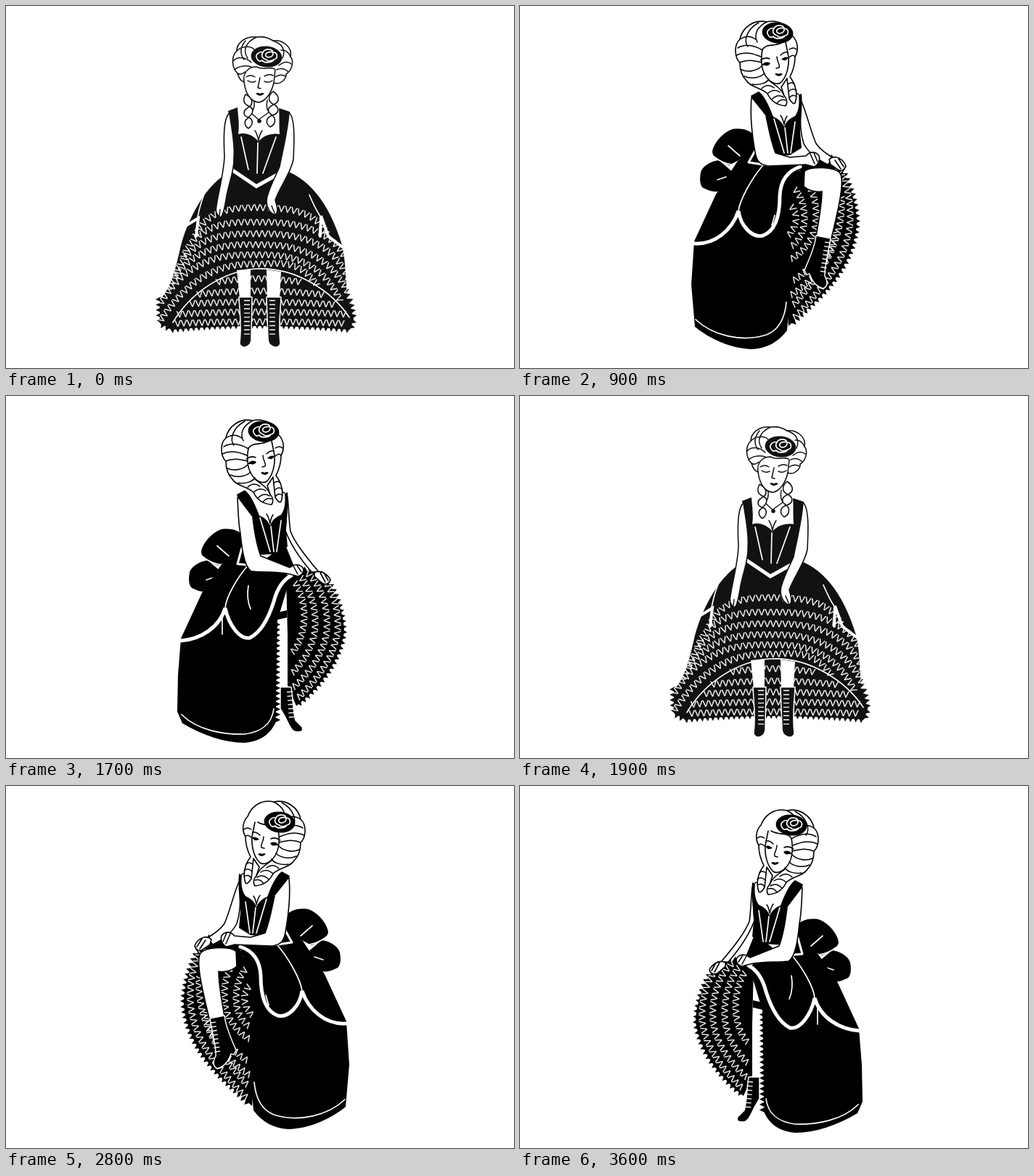
These frames come from a looping animation (700x500 px, 3.8 s). An HTML page without scripts:

```html
<!DOCTYPE html>
<html lang="en">
<head>
<meta charset="utf-8">
<title>Dancer</title>
<style>
html, body { margin: 0; width: 100%; height: 100%; overflow: hidden; background: #fff; }
svg { display: block; width: 100vw; height: 100vh; color: #000; user-select: none; }
path { stroke-linejoin: round; stroke-linecap: round; }
.ink { fill: currentColor; }
.skin { fill: #fff; stroke: currentColor; stroke-width: 1.6; }
.pen { fill: none; stroke: currentColor; stroke-width: 1.5; }
.chalk { fill: none; stroke: #fff; stroke-width: 1.7; }
.band { fill: none; stroke: #fff; stroke-width: 5; stroke-linejoin: miter; }
.boot { fill: currentColor; stroke: #fff; stroke-width: 1.5; }
.lace { fill: none; stroke: #fff; stroke-width: 8; stroke-dasharray: 1.4 4.4; stroke-linecap: butt; }

/* Trim is set along curves; word-spacing cancels the gaps between groups */
.zig, .saw { font-kerning: none; }
.zig { font: 12.5px "Liberation Sans", Arial, sans-serif; word-spacing: -.278em; fill: #fff; stroke: #fff; stroke-width: .3; }
.saw { font: 9.5px "DejaVu Sans", sans-serif; word-spacing: -.318em; fill: currentColor; }

/* Each half turn: bow, step, kick; then the same facing the other way */
.pose { opacity: 0; animation: 1.9s step-end infinite; }
.front { color: #121212; animation-name: front; }
.low { animation-name: low; }
.perch { animation-name: perch; }
.kick { animation-name: kick; }
.side { opacity: 0; animation: side 3.8s step-end infinite; }
.left { animation-delay: -1.9s; }
@keyframes side { 0% { opacity: 1 } 50%, 100% { opacity: 0 } }
@keyframes front { 0% { opacity: 1 } 10.52%, 100% { opacity: 0 } }
@keyframes low {
  0%, 21.05%, 47.36%, 73.68% { opacity: 0 }
  10.52%, 36.84%, 63.15%, 89.47%, 100% { opacity: 1 }
}
@keyframes perch {
  0%, 36.84%, 63.15%, 100% { opacity: 0 }
  21.05%, 47.36% { opacity: 1 }
}
@keyframes kick { 0%, 89.47%, 100% { opacity: 0 } 73.68% { opacity: 1 } }
</style>
</head>
<body>
<svg viewBox="0 0 700 500" aria-hidden="true">
<defs>
  <path id="archRows" d="M264 320C282 282 320 283 350 283S424 284 440 320 M249 347C270 299 320 303 350 303S442 304 464 352 M237 374C260 315 315 319 348 319S445 319 468 380 M226 397C255 330 315 334 346 334S440 334 470 404 M214 418C255 344 315 348 346 348S430 348 458 412 M212 444C265 358 320 361 346 361S400 352 425 388"/>
  <path id="backRows" d="M290 386Q345 376 407 386 M264 403Q345 393 435 403 M250 416Q345 410 456 417 M238 430Q345 424 467 430 M231 443Q345 438 470 443"/>
  <path id="frontHem" d="M466 390L474 410 478 432 474 446Q345 434 228 446L213 438 212 402"/>
  <path id="perchRows" d="M418 214C446 224 455 280 449 310C442 350 420 380 374 428 M438 262C442 300 430 350 372 411 M429 310C423 350 400 376 372 395 M404 345C396 358 385 370 370 378 M382 235C400 252 407 275 402 305C397 325 385 338 369 347 M375 255C388 270 390 295 385 310C381 320 376 325 368 331 M371 280C378 290 378 300 368 312"/>
  <path id="perchHem" d="M411 209L430 211C448 225 463 270 463 300C460 343 438 373 413 400L374 438"/>
  <path id="kickRows" d="M407 216C436 235 452 270 451 303C449 345 425 385 382 426 M402 232C425 252 438 282 437 310C434 350 415 380 386 408 M394 248C412 265 422 290 420 315C417 345 408 370 391 393 M384 260C398 275 407 295 405 320C404 340 400 355 396 368 M375 275C384 285 392 305 393 325"/>
  <path id="kickHem" d="M410 208C438 228 463 268 463 300C460 343 438 373 413 400L376 436"/>
  <path id="kickEdge" d="M348 226C362 240 370 262 373 282C384 304 390 325 391 345C393 375 384 410 371 442"/>
  <path id="kickFrill" d="M343 222C348 206 362 198 374 210 M350 231C356 214 364 210 373 214"/>
  <path id="lowRows" d="M425 248C446 262 456 300 452 328C446 362 424 390 396 417 M413 249C432 265 441 300 437 328C432 356 414 380 392 400 M402 252C417 270 424 300 421 325C417 348 406 364 391 380 M393 258C405 275 409 300 405 320C402 336 397 344 389 354"/>
  <path id="lowHem" d="M394 246C408 240 422 240 432 246C450 258 463 295 464 325C462 355 440 395 400 426"/>
  <path id="lowEdge" d="M372 312L372 456"/>

  <g id="rose">
    <ellipse class="ink" rx="21.5" ry="14.5" transform="rotate(6)"/>
    <path class="chalk" d="M-13 3C-17 -2 -10 -8 -5 -6C-2 -12 8 -11 9 -6C16 -6 16 3 10 4C8 9 -4 9 -6 5C-9 7 -12 6 -13 3 M-5 -6C-9 0 -3 4 0 4 M9 -6C4 -8 -3 -5 -1 -1C2 3 10 0 9 -6 M10 4C6 7 0 6 0 4"/>
  </g>

  <g id="head">
    <path class="skin" d="M340 22C322 18 306 30 303 46C294 54 296 72 303 78C303 88 306 97 312 103C318 113 332 112 341 121C346 132 354 137 366 138C369 134 368 128 364 124L360 112 368 100 371 128C374 133 377 136 379 134C383 122 380 108 372 98C378 86 379 76 379 70C385 60 382 48 376 42C370 26 355 18 340 22Z"/>
    <path class="skin" d="M362 50C350 57 340 51 334 60C331 78 334 92 341 100C347 107 355 109 359 106C367 99 371 84 370 70L366 50"/>
    <path class="pen" d="M329 23C312 32 308 48 314 56 M340 22C326 29 322 40 327 50 M303 46C312 40 320 42 326 47 M300 58C312 51 324 55 334 61 M298 68C310 62 322 66 332 70 M303 78C314 73 324 76 333 78 M305 88C316 93 328 88 333 83 M309 97C320 102 332 98 337 93 M320 108C330 110 340 106 343 101"/>
    <path class="pen" d="M333 114Q341 106 350 113 M341 121Q350 113 358 119 M347 129Q355 121 363 126 M354 135Q358 128 366 130 M343 103C352 110 360 114 364 124 M369 108Q375 104 378 108 M370 118Q376 112 381 117 M371 127Q375 121 381 125 M371 60Q377 56 381 60 M371 71Q376 66 379 70"/>
    <path class="pen" d="M331 75Q338 70 344 73 M359 68Q364 63 369 64 M354 70C354 77 359 82 357 85L353 86"/>
    <path class="ink" d="M333 82Q338 75 345 79Q342 84 338 82Z M360 74Q364 69 370 71Q367 76 364 75Z M351 94Q354 92 356 94Q359 92 362 94Q357 100 351 94Z"/>
  </g>

  <g id="bust">
    <path fill="#fff" d="M329 118L384 118 382 150 364 168 346 156Z"/>
    <path class="pen" d="M374 112Q376 119 384 122 M364 164Q362 155 359 151 M364 164Q365 156 368 152"/>
    <path class="ink" d="M318 124L329 118C338 125 344 140 349 153C355 155 361 160 364 167C366 160 372 155 379 152C385 144 385 132 384 123L388 121C390 140 386 160 386 175L388 196 372 206 340 208 335 175Z"/>
    <path class="chalk" d="M350 156L364 203 M365 168L369 203 M379 160L373 203"/>
  </g>

  <g id="bow">
    <path class="ink" d="M265 202C266 190 280 174 293 170C308 168 320 172 327 184L326 200 288 220C278 216 266 210 265 202Z M274 213C264 214 251 221 249 230C247 240 248 250 254 252C262 256 270 258 276 255L294 230Z"/>
    <path class="chalk" d="M267 208Q280 218 292 219 M287 193L303 207 M272 240L284 236"/>
  </g>

  <g id="perch">
    <use href="#bow"/>
    <path class="ink" d="M374 225L412 208 430 211C448 225 464 270 464 300C460 345 438 375 413 402L370 442 362 330Z"/>
    <text class="saw"><textPath href="#perchHem">▲▲▲▲▲▲▲▲▲▲ ▲▲▲▲▲▲▲▲▲▲ ▲▲▲▲▲▲▲▲▲▲ ▲▲▲▲▲▲▲▲▲▲ ▲▲▲▲▲</textPath></text>
    <text class="zig"><textPath href="#perchRows">
      <tspan>VVVVVVVVVVVVVVVVVVVV</tspan> <tspan>VVVVVVVVVVVVVVVVVVVV</tspan>
      <tspan>VVVVVVVVVVVVVVVVVVVV</tspan> <tspan>VVVVVVVVVVVVVVVVVVVV</tspan>
      <tspan>VVVVVVVVVVVVVVVVVVVV</tspan> <tspan>VVVVVVVVVVVVVVVVVVVV</tspan>
    </textPath></text>
    <path class="ink" d="M382 229L394 224 393 254 383 251Z"/>
    <path class="skin" d="M392 228C402 221 434 222 441 231C448 242 438 284 429 321L408 318C412 295 416 274 416 256C406 258 396 254 391 249Z"/>
    <path class="boot" d="M408 317L428 321C424 345 419 362 420 373C425 382 423 388 418 390C408 388 402 379 399 370L395 371 392 365C398 350 406 335 408 317Z"/>
    <path class="lace" d="M424 326L417 372"/>
    <path class="ink" d="M326 196L300 214 270 260 240 325 236 385 241 443C262 460 290 473 320 474C340 473 356 464 368 448L372 400 366 340 374 238 388 218 345 206Z"/>
    <path class="band" d="M240 328C268 330 292 310 301 283C304 304 320 321 335 317C354 310 358 285 358 262C359 242 368 228 386 222"/>
    <path class="chalk" d="M334 221C318 240 303 268 301 283 M351 289L347 303 M242 433C265 455 305 465 340 454C357 447 365 432 367 409"/>
    <path class="chalk" style="stroke-width: 3" d="M325 198L315 216 342 220"/>
    <path class="skin" d="M387 130C396 150 400 172 408 190C415 200 425 206 432 210L424 219C408 211 396 200 391 190C386 175 386 165 387 130Z"/>
    <path class="skin" d="M426 212C434 204 446 212 449 221C447 227 442 229 438 226L428 219Z M434 213L442 225 M439 211L446 222"/>
    <use href="#bust"/>
    <path class="skin" d="M319 127C317 150 320 180 324 202C326 214 330 219 342 221L394 219 405 222C411 220 414 212 412 207C408 201 400 200 394 207L372 209 352 203C345 185 342 165 339 152"/>
    <path class="pen" d="M400 204L406 218 M405 203L410 215"/>
    <use href="#head"/>
  </g>

  <g id="kick">
    <use href="#bow" x="3" y="2"/>
    <path class="ink" d="M408 208C436 228 464 268 464 300C460 345 438 375 413 402L372 440 360 300 374 270 398 230Z"/>
    <text class="saw"><textPath href="#kickHem">▲▲▲▲▲▲▲▲▲▲ ▲▲▲▲▲▲▲▲▲▲ ▲▲▲▲▲▲▲▲▲▲ ▲▲▲▲▲▲▲▲▲▲</textPath></text>
    <text class="zig"><textPath href="#kickRows">
      <tspan>VVVVVVVVVVVVVVVVVVVV</tspan> <tspan>VVVVVVVVVVVVVVVVVVVV</tspan>
      <tspan>VVVVVVVVVVVVVVVVVVVV</tspan> <tspan>VVVVVVVVVVVVVVVVVVVV</tspan>
      <tspan>VVVVVVVVVVVVVVVVVVVV</tspan>
    </textPath></text>
    <path class="skin" d="M371 125C378 145 382 165 386 188L378 205 373 195Z"/>
    <path class="skin" d="M352 232L384 207C402 175 428 142 438 115L447 86 463 92C458 112 448 135 438 154L399 232 372 280Z"/>
    <path class="ink" d="M366 212C372 226 384 230 399 226L395 236C380 240 366 232 358 222Z"/>
    <path class="ink" d="M446 86C455 66 465 45 465 22C466 15 474 14 477 21C478 30 480 38 484 42L489 37 491 45 483 62 474 64C472 75 468 84 464 93Z"/>
    <path class="lace" d="M454 80C462 66 467 46 468 28"/>
    <path class="ink" d="M298 214L270 260 240 325 236 385 240 443C255 462 295 477 326 475C345 472 361 463 370 446C385 410 394 375 391 345C389 322 382 302 373 282C370 262 362 240 348 224L340 206Z"/>
    <text class="saw"><textPath href="#kickEdge">▲▲▲▲▲▲▲▲▲▲ ▲▲▲▲▲▲▲▲▲▲ ▲▲▲▲▲▲▲▲▲▲ ▲▲▲▲</textPath></text>
    <path class="band" d="M240 328C268 330 292 312 301 285C304 300 314 317 327 323L337 320C344 304 336 292 328 278C321 262 325 238 334 222"/>
    <path class="chalk" d="M326 238C314 252 303 270 301 285 M320 256Q314 268 316 279 M241 440C268 460 315 470 345 461Q358 456 363 446"/>
    <path class="ink" d="M338 205L358 192 376 202 373 218 352 230 340 222Z"/>
    <text class="zig"><textPath href="#kickFrill">VVVVVVVVVVV</textPath></text>
    <use href="#bust" x="-16" y="3"/>
    <path class="skin" d="M301 129C293 150 286 180 284 205C284 215 288 219 298 219L340 220 345 212 340 206 312 202C310 190 313 175 317 158"/>
    <use href="#head" x="-14" y="1"/>
  </g>

  <g id="low">
    <use href="#bow" x="4" y="14"/>
    <path class="ink" d="M386 250L408 240 432 246C450 258 465 295 466 325C462 357 440 397 400 428L388 400 388 330Z"/>
    <text class="saw"><textPath href="#lowHem">▲▲▲▲▲▲▲▲▲▲ ▲▲▲▲▲▲▲▲▲▲ ▲▲▲▲▲▲▲▲▲▲ ▲▲▲▲▲▲▲▲▲▲</textPath></text>
    <text class="zig"><textPath href="#lowRows">
      <tspan>VVVVVVVVVVVVVVVVVVVV</tspan> <tspan>VVVVVVVVVVVVVVVVVVVV</tspan>
      <tspan>VVVVVVVVVVVVVVVVVVVV</tspan> <tspan>VVVVVVVVVVVVVVVVVVVV</tspan>
    </textPath></text>
    <path fill="#fff" d="M376 278L386 276 388 400 391 404 377 404Z"/>
    <path class="ink" d="M374 299L387 296 387 306 374 309Z"/>
    <path class="boot" d="M378 402L393 402C396 425 396 440 399 448L408 457C410 462 408 464 402 464C394 465 391 456 385 444L378 432Z"/>
    <path class="lace" d="M391 408L394 446"/>
    <path class="ink" d="M324 209L300 228 270 272 241 335 237 385 236 436 243 452C270 468 300 479 329 479C348 477 362 470 371 452L374 310 392 250 350 220Z"/>
    <text class="saw"><textPath href="#lowEdge">▲▲▲▲▲▲▲▲▲▲ ▲▲▲▲▲▲▲▲▲</textPath></text>
    <path class="band" d="M241 338C268 336 294 320 302 293C307 316 322 337 336 334C352 326 362 306 369 284C374 264 382 254 393 248"/>
    <path class="chalk" d="M334 233C318 252 303 278 302 293 M298 302V329 M334 262Q331 280 337 294 M242 440C264 462 300 468 329 467C352 464 366 454 369 432"/>
    <path class="chalk" style="stroke-width: 3" d="M325 210L319 232 340 234 M384 214L390 228"/>
    <path class="ink" d="M374 212L386 208 398 238 380 242 352 230Z"/>
    <path class="skin" d="M388 140C390 160 390 175 392 187C398 202 410 218 431 243L421 243C408 228 394 210 385 186Z"/>
    <path class="skin" d="M425 244C433 239 444 247 447 254C445 261 438 261 434 257L425 249Z M433 244L440 257 M438 244L444 255"/>
    <use href="#bust" y="12"/>
    <path class="skin" d="M319 140C320 160 320 175 323 190C325 210 328 236 338 242C352 244 372 242 391 246L402 249C409 248 412 240 408 236C402 231 396 233 391 237L351 221C345 205 342 185 340 168"/>
    <path class="pen" d="M396 235L402 246 M401 234L407 243"/>
    <use href="#head" y="12"/>
  </g>
</defs>

<g class="pose front">
  <path class="ink" d="M312 228C275 242 248 300 240 335C232 372 225 392 212 406L212 438 228 447Q345 437 474 447L479 432 470 400C468 370 467 345 463 330C445 270 415 235 378 225Z"/>
  <text class="saw"><textPath href="#frontHem">▲▲▲▲▲▲▲▲▲▲ ▲▲▲▲▲▲▲▲▲▲ ▲▲▲▲▲▲▲▲▲▲ ▲▲▲▲▲▲▲▲▲▲ ▲▲▲▲▲▲▲▲▲▲ ▲▲</textPath></text>
  <text class="zig"><textPath href="#archRows">
    <tspan>VVVVVVVVVVVVVVVVVVVV</tspan> <tspan>VVVVVVVVVVVVVVVVVVVV</tspan>
    <tspan>VVVVVVVVVVVVVVVVVVVV</tspan> <tspan>VVVVVVVVVVVVVVVVVVVV</tspan>
    <tspan>VVVVVVVVVVVVVVVVVVVV</tspan> <tspan>VVVVVVVVVVVVVVVVVVVV</tspan>
    <tspan>VVVVVVVVVVVVVVVVVVVV</tspan> <tspan>VVVVVVVVVVVVVVVVVVVV</tspan>
    <tspan>VVVVVVVVVVVVVVVVVVVV</tspan> <tspan>VVVVVVVVVVVVVVVVVVVV</tspan>
    <tspan>VVVVVVVVVVVVVVVVVVVV</tspan> <tspan>VVVVVVVVVVVVVVVVVVVV</tspan>
  </textPath></text>
  <text class="zig"><textPath href="#backRows">
    <tspan>VVVVVVVVVVVVVVVVVVVV</tspan> <tspan>VVVVVVVVVVVVVVVVVVVV</tspan>
    <tspan>VVVVVVVVVVVVVVVVVVVV</tspan> <tspan>VVVVVVVVVVVVVVVVVVVV</tspan>
    <tspan>VVVVVVVVVVVVVVVVVVVV</tspan> <tspan>VVVVVVVVVVVVVVVVVVVV</tspan>
  </textPath></text>
  <path class="chalk" d="M230 437C255 395 300 366 345 363C400 360 450 395 473 430 M278 248Q268 270 264 292 M418 261Q426 280 434 292"/>
  <path class="band" style="stroke-width: 4" d="M242 307L265 293 262 318 M433 318L434 290 444 318 465 334"/>
  <path fill="#fff" d="M318 365L337 363 337 404 322 404Z M359 364L379 367 377 404 360 404Z"/>
  <path class="boot" d="M321 402H339L338 458C340 472 323 475 322 466C325 440 322 425 321 402Z M359 402H379C378 425 375 440 378 466C377 475 360 472 361 458Z"/>
  <path class="lace" d="M332 406V456 M367 406V456"/>
  <path fill="#fff" d="M319 138L377 138 378 178 348 190 319 178Z"/>
  <path class="ink" d="M306 145L319 140C320 155 322 165 320 177C330 174 340 178 348 187C355 178 368 175 377 177C376 165 377 152 376 141L391 146C391 165 388 190 380 208L378 230 345 246 312 230C316 205 312 175 306 145Z"/>
  <path class="band" d="M311 226L345 249 379 230"/>
  <path class="chalk" d="M347 189L346 231 M324 181L334 226 M372 181L354 231"/>
  <path class="pen" d="M348 186Q346 176 343 172 M348 186Q349 178 353 172 M342 132Q343 142 338 146 M360 130Q358 142 362 146 M337 147L348 157 362 147"/>
  <circle class="ink" cx="349" cy="159" r="2.8"/>
  <path class="skin" d="M308 148C299 155 300 185 301 208C300 232 293 255 290 276C288 284 291 290 296 292C300 288 302 274 304 262C308 242 315 225 314 210C316 190 310 165 308 148Z"/>
  <path class="skin" d="M390 147C399 155 397 190 396 212C392 232 377 250 371 268C374 278 376 287 370 288C362 286 356 272 361 260C365 246 373 232 377 222C380 205 388 175 390 147Z"/>
  <path class="pen" d="M295 281L294 290 M366 276L370 286"/>
  <path class="skin" d="M345 43C330 41 318 51 318 62C310 70 311 85 319 93C321 100 324 104 328 105C331 128 342 133 349 133C358 131 366 120 369 106C378 110 387 100 386 94C396 88 396 74 392 70C395 56 380 46 368 48C361 43 352 42 345 43Z"/>
  <path class="skin" d="M330 122C325 132 329 136 336 139C325 144 326 152 335 154C326 158 329 166 334 169C341 164 341 156 334 154C342 147 341 142 336 139C342 133 338 126 330 122Z"/>
  <path class="skin" d="M368 118C377 124 378 132 369 136C377 140 377 148 367 151C373 156 371 164 364 167C357 162 358 154 367 151C359 146 360 140 369 136C360 132 361 124 368 118Z"/>
  <path class="pen" d="M328 105C326 92 334 84 345 84C356 90 366 82 371 88L369 106 M345 43C330 50 326 62 333 72 M330 48C322 58 322 66 328 74 M318 62C324 56 336 54 342 60 M313 76C320 68 332 72 338 78 M315 88C322 82 332 82 338 84 M319 93Q324 96 329 91"/>
  <path class="pen" d="M368 48C380 52 386 60 381 72 M379 61Q388 60 392 70 M376 82Q386 74 393 80 M373 88Q382 84 389 91 M371 98Q378 93 385 97"/>
  <path class="pen" d="M331 98Q337 94 343 98 M356 97Q363 93 368 96 M333 103Q338 107 344 104 M356 104Q362 107 367 103 M350 99L347 113 351 114"/>
  <path class="ink" d="M344 121Q347 119 350 121Q353 119 356 121Q350 127 344 121Z"/>
  <use href="#rose" x="359" y="70"/>
</g>

<g class="side right">
  <g class="pose low"><use href="#low"/><use href="#rose" x="355" y="49"/></g>
  <g class="pose perch"><use href="#perch"/><use href="#rose" x="355" y="37"/></g>
  <g class="pose kick"><use href="#kick"/><use href="#rose" x="341" y="38"/></g>
</g>
<g class="side left">
  <g class="pose low"><use href="#low" transform="translate(708) scale(-1 1)"/><use href="#rose" x="374" y="54"/></g>
  <g class="pose perch"><use href="#perch" transform="translate(709) scale(-1 1)"/><use href="#rose" x="377" y="50"/></g>
  <g class="pose kick"><use href="#kick" transform="translate(702 -1) scale(-1 1)"/><use href="#rose" x="384" y="50"/></g>
</g>
</svg>
</body>
</html>
```
